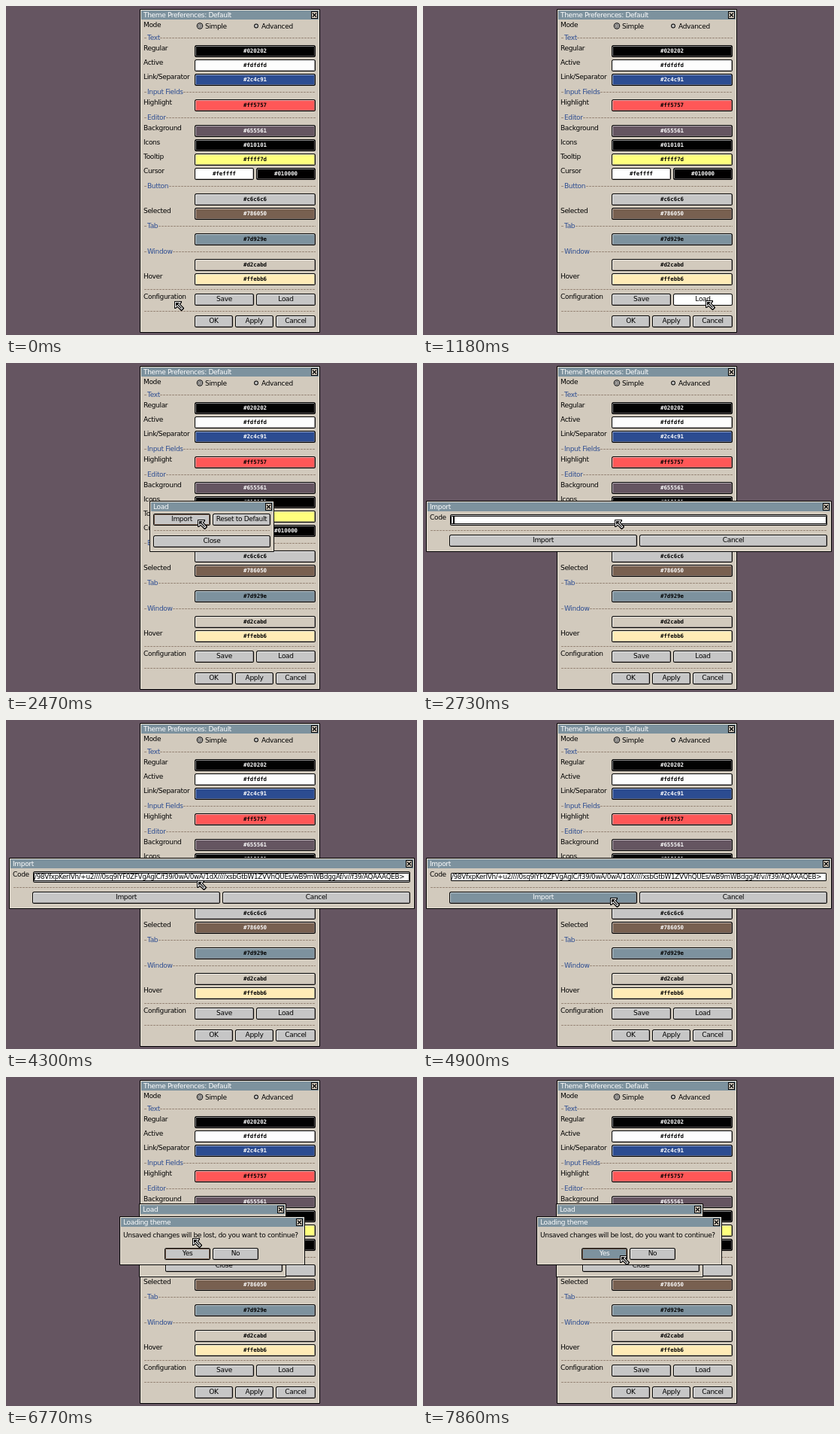
These frames come from a looping animation (547x437 px, 8 s). An HTML page with a canvas:

```html
<!DOCTYPE html>
<html lang="en">
<head>
<meta charset="utf-8">
<title>Theme Preferences</title>
<style>
  html, body { margin: 0; width: 100%; height: 100%; overflow: hidden; background: #655561; }
  canvas { display: block; }
</style>
</head>
<body>
<canvas id="stage" width="547" height="437"></canvas>
<script>
const ctx = document.getElementById('stage').getContext('2d');
const LOOP = 8000;
const INK = '#020202', PAPER = '#fdfdfd', BLUE = '#2c4c91', STEEL = '#7d929e';
const PANEL = '#d2cabd', GREY = '#c6c6c6', BROWN = '#786050', DASH = '#9a897a';
const LIGHT = 'rgba(255,255,255,.55)', SHADE = 'rgba(135,128,128,.6)';
const UI_FONT = '9px "DejaVu Sans", Verdana, sans-serif';
const CODE_FONT = '8.85px "DejaVu Sans", Verdana, sans-serif';
const HEX_FONT = 'bold 7.4px "DejaVu Sans Mono", "Noto Sans Mono", monospace';
const CODE = '/98VfxpKerIVh/+u2////0sq9lYF0ZFVgAglC/f39/0wA/0wA/1dX////' +
  'xsbGtbW1ZVVhQUEs/wB9mWBdggAf/v//f39/AQAAAQEB>';

// Pointer moves: start, interval, step count, then [progress, x, y] points.
const MOVES = [
  [640, 57.7, 14, [[0, 224, 392], [.14, 229, 397], [.43, 290, 401], [.714, 376, 391], [1, 389, 389]]],
  [1870, 60, 11, [[0, 389, 389], [.18, 372, 345], [.364, 310, 258], [.6, 275, 228], [1, 255, 208]]],
  [4300, 60, 8, [[0, 255, 208], [.5, 252, 226], [1, 249, 236]]],
  [5580, 50, 5, [[0, 249, 236], [.5, 246, 218], [1, 238, 198]]],
  [6590, 60, 12, [[0, 238, 198], [.5, 253, 222], [1, 262, 239]]],
  [7530, 120, 2, [[0, 262, 239], [1, 262, 237]]]
];
const PRESSES = [[1570, 1690], [2610, 2730], [4900, 5020], [6150, 6210], [7860, 8000]];

const ARROW = new Path2D('M0 0h10v2l-2 2 5 5v1l-3 3h-1l-5-5-2 2h-2z');
const ARROW_LIGHT = new Path2D('M1 1h8l-2.5 3 5 5.5-2 2-5.5-5-3 2.5z');
const ARROW_CORE = new Path2D('M2 2h5l-2 2 5 5.3-.8.8-5.2-5.1-2 2z');

let pointer, pressed, active;

const between = (t, a, b) => t >= a && t < b;

function pointerAt(t) {
  let pos = { x: 224, y: 392 };
  for (const [start, step, count, pts] of MOVES) {
    if (t < start) break;
    const s = Math.min(1, (Math.floor((t - start) / step + .001) + 1) / count);
    const i = Math.max(1, pts.findIndex(p => p[0] >= s));
    const a = pts[i - 1], b = pts[i], k = (s - a[0]) / (b[0] - a[0]);
    pos = { x: Math.round(a[1] + (b[1] - a[1]) * k), y: Math.round(a[2] + (b[2] - a[2]) * k) };
  }
  return pos;
}

function rect(x, y, w, h, color) {
  ctx.fillStyle = color;
  ctx.fillRect(x, y, w, h);
}

function round(x, y, w, h, r, color) {
  ctx.fillStyle = color;
  ctx.beginPath();
  ctx.roundRect(x, y, w, h, r);
  ctx.fill();
}

function disc(x, y, r, color) {
  ctx.fillStyle = color;
  ctx.beginPath();
  ctx.arc(x, y, r, 0, Math.PI * 2);
  ctx.fill();
}

// Text is centred vertically on cy.
function text(str, x, cy, color = INK, align = 'left', font = UI_FONT) {
  ctx.font = font;
  ctx.letterSpacing = font === HEX_FONT ? '0px' : '-0.33px';
  ctx.textAlign = align;
  ctx.fillStyle = color;
  ctx.fillText(str, x, cy + 3);
  return ctx.measureText(str).width;
}

function dashes(x0, x1, y) {
  for (let x = x0; x < x1; x += 4) rect(x, y, Math.min(3, x1 - x), 1, DASH);
}

function section(title, cy) {
  dashes(184, 187, cy);
  dashes(Math.ceil(188 + text(title, 188, cy, BLUE)), 412, cy);
}

// Outline with a bevel: light along the top left, shade along the bottom right.
function plate(x0, x1, cy, fill, light = LIGHT, shade = SHADE) {
  const top = cy - 7, w = x1 - x0;
  round(x0, top, w, 16, 2.5, INK);
  round(x0 + 1, top + 1, w - 2, 14, 1.5, fill);
  rect(x0 + 2, top + 1, w - 4, 1, light);
  rect(x0 + 1, top + 2, 1, 12, light);
  rect(x0 + 2, top + 14, w - 4, 1, shade);
  rect(x1 - 2, top + 2, 1, 12, shade);
}

function swatch(x0, x1, cy, hex) {
  const [r, g, b] = [1, 3, 5].map(i => parseInt(hex.slice(i, i + 2), 16));
  plate(x0, x1, cy, hex);
  const bright = r * .299 + g * .587 + b * .114 > 120;
  text(hex, (x0 + x1) / 2, cy, bright ? INK : PAPER, 'center', HEX_FONT);
}

// A focused button ignores hover and shows a darker ring.
function button(label, x0, x1, cy, focused = false) {
  const over = active && between(pointer.x, x0, x1) && between(pointer.y, cy - 7, cy + 9);
  const down = over && pressed;
  const lit = over && !down && !focused;
  const fill = down ? STEEL : lit ? '#feffff' : GREY;
  const ring = focused ? BROWN : undefined;
  plate(x0, x1, cy, fill, ring, lit ? fill : ring);
  text(label, (x0 + x1) / 2, cy, down ? PAPER : INK, 'center');
}

function panel(title, x, y, w, h) {
  round(x, y, w, h, 1, INK);
  rect(x + 1, y + 1, w - 2, h - 2, '#e8e1d5');
  rect(x + 2, y + 2, w - 4, h - 4, PANEL);
  rect(x + 2, y + 2, w - 4, 12, STEEL);
  text(title, x + 5, y + 8, PAPER);
  const cx = x + w - 12, cy = y + 3;
  rect(cx, cy, 9, 10, INK);
  rect(cx + 1, cy + 1, 7, 8, PANEL);
  ctx.strokeStyle = INK;
  ctx.lineWidth = 1.3;
  ctx.beginPath();
  ctx.moveTo(cx + 2, cy + 2.5);
  ctx.lineTo(cx + 7, cy + 7.5);
  ctx.moveTo(cx + 7, cy + 2.5);
  ctx.lineTo(cx + 2, cy + 7.5);
  ctx.stroke();
}

function radio(label, x, on) {
  disc(x, 26.5, on ? 4.2 : 2.9, INK);
  disc(x, 26.5, on ? 3.2 : 1.9, GREY);
  if (on) {
    disc(x, 26.5, 2.3, '#55504c');
    disc(x, 26.5, 1.3, GREY);
  }
  text(label, x + 7, 27);
}

function preferences() {
  panel('Theme Preferences: Default', 178, 4, 240, 430);
  text('Mode', 183, 25);
  radio('Simple', 258, true);
  radio('Advanced', 333, false);

  const sections = { Text: 42, 'Input Fields': 114, Editor: 148, Button: 239, Tab: 292, Window: 326 };
  for (const name in sections) section(name, sections[name]);

  const rows = [
    ['Regular', 59, '#020202'], ['Active', 78, '#fdfdfd'], ['Link/Separator', 97, BLUE],
    ['Highlight', 131, '#ff5757'], ['Background', 165, '#655561'], ['Icons', 184, '#010101'],
    ['Tooltip', 203, '#ffff7d'], ['', 256, GREY], ['Selected', 275, BROWN],
    ['', 309, STEEL], ['', 343, PANEL], ['Hover', 362, '#ffebb6']
  ];
  for (const [label, cy, hex] of rows) {
    text(label, 183, cy - 3);
    swatch(251, 412, cy, hex);
  }
  text('Cursor', 183, 219);
  swatch(251, 330, 222, '#feffff');
  swatch(333, 412, 222, '#010000');

  dashes(184, 412, 376);
  text('Configuration', 183, 386);
  button('Save', 251, 330, 389);
  button('Load', 333, 412, 389);
  dashes(184, 412, 405);
  button('OK', 251, 302, 418);
  button('Apply', 305, 356, 418);
  button('Cancel', 359, 412, 418);
}

function loadEmpty() {
  panel('Load', 191, 183, 166, 68);
  button('Import', 196, 272, 207, true);
  button('Reset to Default', 275, 352, 207);
  dashes(197, 351, 222);
  button('Close', 196, 352, 236);
}

function loadList() {
  panel('Load', 177, 168, 196, 98);
  text('Peach', 181, 189);
  button('Load', 212, 261, 192, true);
  button('Export', 264, 313, 192);
  button('Delete', 316, 368, 192);
  dashes(183, 367, 207);
  button('Import', 212, 288, 221);
  button('Reset to Default', 291, 368, 221);
  dashes(213, 367, 236);
  button('Close', 212, 368, 250);
}

function codeField(t) {
  const focused = t < 4900, pasted = t >= 3480;
  if (focused) {
    round(36, 201, 502, 15, 2.5, INK);
    round(37, 202, 500, 13, 1.5, GREY);
  }
  round(37, 203, 500, 11, 1.5, INK);
  rect(38, 204, 498, 9, '#feffff');
  if (pasted) text(CODE, 38, 208, INK, 'left', CODE_FONT);
  const caretOn = t < 3230 || between(t, 3480, 3930) || t >= 4430;
  if (focused && caretOn) rect(pasted ? 529 : 40, 204, 2, 9, INK);
}

function importCode(t) {
  panel('Import', 4, 183, 540, 68);
  text('Code', 9, 205);
  codeField(t);
  dashes(10, 538, 222);
  button('Import', 35, 285, 235);
  button('Cancel', 288, 538, 235);
}

function confirmLoad() {
  panel('Loading theme', 151, 185, 247, 65);
  text('Unsaved changes will be lost, do you want to continue?', 156, 210);
  button('Yes', 211, 272, 234, true);
  button('No', 275, 336, 234);
}

function drawPointer() {
  ctx.save();
  ctx.translate(pointer.x, pointer.y);
  ctx.fillStyle = INK;
  ctx.fill(ARROW);
  ctx.fillStyle = PAPER;
  ctx.fill(ARROW_LIGHT);
  ctx.fillStyle = INK;
  ctx.fill(ARROW_CORE);
  ctx.restore();
}

function draw(t) {
  pointer = pointerAt(t);
  pressed = PRESSES.some(([a, b]) => between(t, a, b));
  rect(0, 0, 547, 437, '#655561');

  const layers = [preferences];
  if (between(t, 1690, 2730)) layers.push(loadEmpty);
  if (between(t, 2730, 5020)) layers.push(importCode);
  if (t >= 5020) layers.push(loadList);
  if (t >= 6210) layers.push(confirmLoad);

  layers.forEach((layer, i) => {
    active = i === layers.length - 1;
    layer(t);
  });
  drawPointer();
}

const began = performance.now();
function frame() {
  draw((performance.now() - began) % LOOP);
  requestAnimationFrame(frame);
}
frame();
</script>
</body>
</html>
```
